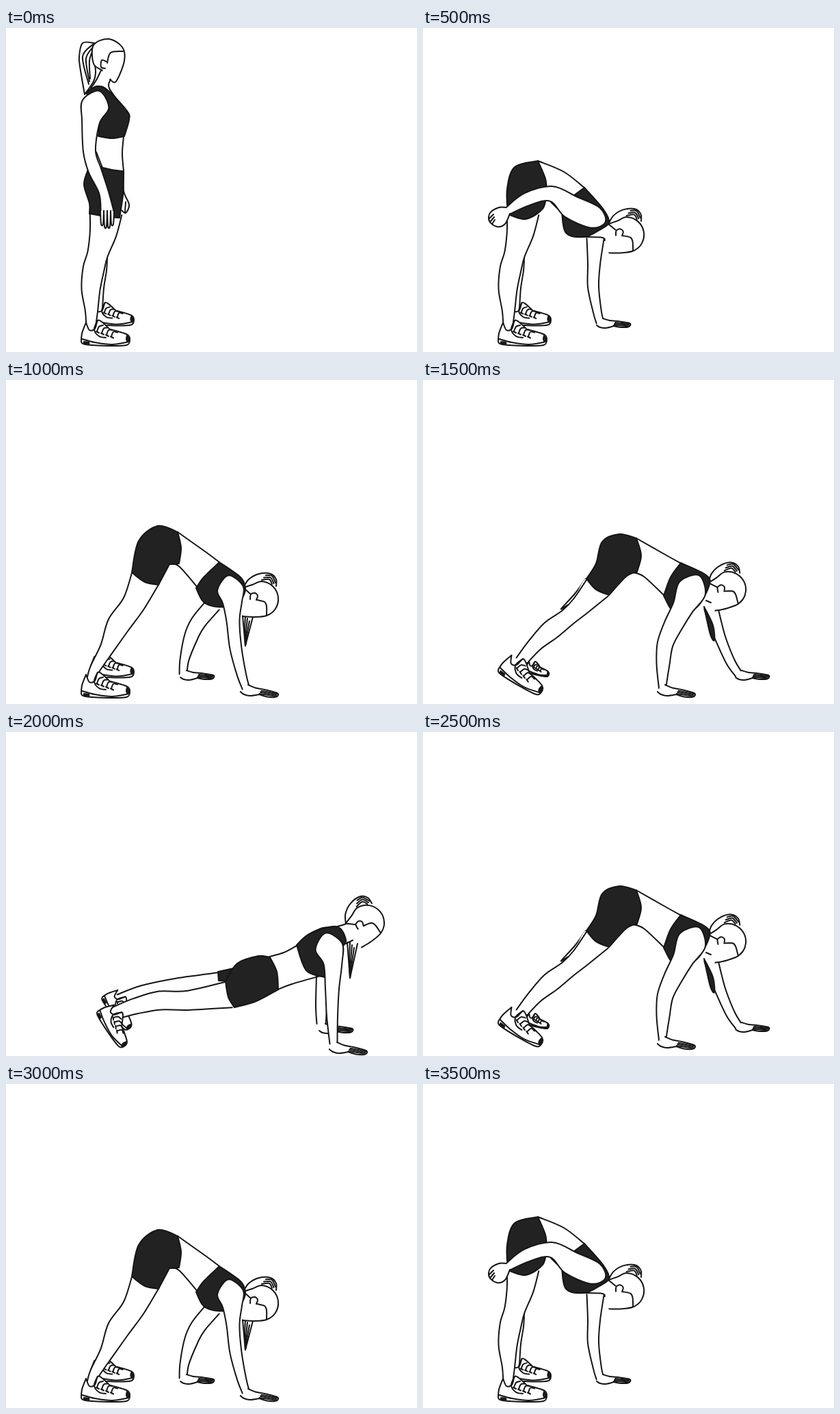
An HTML page with a canvas that plays this animation: 601 px wide and 473 px high, repeating every 4000 ms.

```html
<!DOCTYPE html>
<html lang="en">
<head>
<meta charset="utf-8">
<title>Walkout exercise</title>
<style>
html, body { margin: 0; width: 100%; height: 100%; overflow: hidden; background: #fff; }
canvas { display: block; }
</style>
</head>
<body>
<canvas id="stage" width="601" height="473"></canvas>
<script>
const ctx = document.getElementById('stage').getContext('2d');
const INK = '#151515', CLOTH = '#222222', SKIN = '#fff';
const STEP = 500;

const parse = text => text.trim().split(/\s+/).map(p => p.split(',').map(Number));

// Appends a smooth curve through the points to the path.
function spline(path, pts) {
  for (let i = 0; i < pts.length - 1; i++) {
    const b = pts[i], c = pts[i + 1];
    const a = pts[i - 1] || b, d = pts[i + 2] || c;
    path.bezierCurveTo(
      b[0] + (c[0] - a[0]) / 6, b[1] + (c[1] - a[1]) / 6,
      c[0] - (d[0] - b[0]) / 6, c[1] - (d[1] - b[1]) / 6, c[0], c[1]);
  }
}

// Reads "x,y" key points; a slash makes the point before it a corner.
function trace(text) {
  const path = new Path2D();
  let last = null;
  for (const part of text.split('/')) {
    const pts = parse(part);
    if (last) pts.unshift(last);
    else path.moveTo(...pts[0]);
    spline(path, pts);
    last = pts[pts.length - 1];
  }
  return path;
}

function line(...texts) {
  for (const text of texts) ctx.stroke(trace(text));
}

function paint(path, color) {
  ctx.fillStyle = color;
  ctx.fill(path);
  ctx.stroke(path);
}

const skin = text => paint(trace(text), SKIN);
const dark = text => paint(trace(text), CLOTH);

// Tapered limb along "x,y,width" joints, open at the far end; round closes the near end.
function limb(text, round = false) {
  const joints = parse(text);
  const left = [], right = [];
  let cap;
  joints.forEach(([x, y, width], i) => {
    const from = joints[i - 1] || joints[i], to = joints[i + 1] || joints[i];
    const angle = Math.atan2(to[1] - from[1], to[0] - from[0]);
    const dx = Math.cos(angle) * width / 2, dy = Math.sin(angle) * width / 2;
    left.unshift([x + dy, y - dx]);
    right.push([x - dy, y + dx]);
    if (i === 0) cap = [x - dx, y - dy];
  });
  const outline = [...left, ...(round ? [cap] : []), ...right];
  const body = new Path2D();
  body.moveTo(...outline[0]);
  spline(body, outline);
  ctx.fillStyle = SKIN;
  ctx.fill(body);
  for (const side of round ? [outline] : [left, right]) {
    const edge = new Path2D();
    edge.moveTo(...side[0]);
    spline(edge, side);
    ctx.stroke(edge);
  }
}

function placed(x, y, turn, size, draw) {
  ctx.save();
  ctx.translate(x, y);
  ctx.rotate(turn);
  ctx.scale(size, size);
  ctx.lineWidth /= size;
  draw();
  ctx.restore();
}

// x,y is the upper side of the wrist.
function hand(x, y, turn = 0, size = 1) {
  placed(x, y, turn, size, () => {
    skin('-9,10 -4,13 4,14 16,11 / 26,13 38,12 39,7 22,4 10,3 0,0');
    for (let i = 0; i < 3; i++) line(`${18 - i},${6 + i * 2} ${39 - i},${8 + i * 1.6}`);
  });
}

// x,y is the lower back corner of the heel.
function shoe(x, y, turn = 0, size = 1) {
  placed(x, y, turn, size, () => {
    skin('7,-28 1,-12 0,0 / 6,4 40,6 66,5 71,-2 68,-10 54,-15 42,-18 / 30,-29 24,-31 20,-19 12,-17 7,-28');
    line('1,-4 20,1 45,4 70,0', '24,-31 19,-18 26,-8 36,-6');
    for (let i = 0; i < 4; i++) {
      const px = 23 + i * 7, py = -15 + i * 2.5;
      line(`${px},${py} ${px + 3},${py - 7} ${px + 9},${py - 9 + i}`, `${px - 1},${py} ${px + 3},${py + 2}`);
    }
    dark('4,0 11,1 / 11,3 4,2 / 4,0');
    dark('67,-9 70,-4 68,0 66,-4 67,-9');
  });
}

// Lowered head with its bun; x,y is the middle of the skull.
function head(x, y, turn) {
  placed(x, y, turn, 1, () => {
    skin('-25,-17 -17,-29 -2,-37 15,-37 23,-29 23,-19');
    for (let i = 0; i < 3; i++) line(`${2 + i * 3},${-28 - i * 3.5} ${13 + i * 2},${-29 - i * 2.5} ${17 + i * 2.5},${-22 - i}`);
    skin('-25,-17 -12,-21 2,-26 18,-19 26,-3 22,14 9,24 -10,26 -26,25');
    line('-25,-17 -15,-8', '-15,0 -14,-7 -8,-9 -4,-5 -6,1', '-5,1 6,4 9,10 9,23');
  });
}

function hangingHair(x, y, length) {
  skin(`${x},${y} ${x + 4},${y + length} / ${x + 15},${y + 2}`);
  for (let i = 0; i < 3; i++) line(`${x + 4},${y + length} ${x + 3 + i * 2},${y + length * .55} ${x + 4 + i * 3},${y + i * 4}`);
}

function standingLegs() {
  line('148,335 147,354 143,380 141,410');
  shoe(123,429, 0, .9);
  limb('146,270,47 142,300,39 134,330,30 128,352,31 124,382,27 125,414,18 124,440,13');
  shoe(110,458);
}

function stand() {
  standingLegs();
  skin('172,210 172,238 180,258 175,270 169,266');
  line('174,269 175,254', '172,158 170,183 172,209', '132,181 141,204');
  dark('121,204 114,228 122,256 122,271 / 144,275 166,277 / 171,244 172,209 / 155,207 137,203 / 121,204');

  skin('129,22 112,22 107,42 109,62 115,97 / 128,78 131,62 126,36');
  for (let i = 0; i < 3; i++) line(`127,${24 + i * 4} ${112 + i * 5},${42 + i * 3} ${121 + i},${82 - i * 4}`);
  skin('141,62 128,52 128,25 150,16 170,28 173,48 161,78 152,75');
  line('139,62 132,76 124,88', '153,75 151,88 172,117', '171,34 153,36 148,51', '147,49 140,47 139,57 145,59');

  dark('117,94 133,85 149,91 177,121 180,134 173,158 / 155,161 135,158 / 137,135 / 117,94');
  limb('131,111,40 124,137,26 122,180,18 130,208,19 143,240,14 148,268,19', true);
  for (let i = 0; i < 4; i++) {
    const x = 138 + i * 5, tip = 286 + 4 * Math.sin(Math.PI * i / 3);
    skin(`${x},267 ${x + 1},${tip} ${x + 4},${tip} ${x + 5},267`);
  }
}

function bend() {
  standingLegs();
  limb('252,308,25 250,345,18 249,378,16 255,415,12 259,430,11');
  hand(263,424);
  line('168,194 206,210 237,234', '186,253 203,270');
  dark('124,272 123,235 134,203 168,194 / 179,220 181,240 / 175,264 150,279 124,272');
  head(297,302, -.05);
  line('236,305 262,306 266,310');
  dark('236,233 264,265 272,284 258,295 / 236,305 209,299 203,268 / 221,244 / 236,233');
  limb('252,277,32 216,261,34 188,242,22 152,250,19 124,267,11', true);
  skin('121,262 111,262 98,270 97,282 108,290 120,286 127,271');
  for (let i = 0; i < 3; i++) line(`${97 + i * 2},${278 + i * 4} ${103 + i},${272 + i * 4}`);
}

function pike() {
  line('159,390 148,407');
  shoe(123,429, 0, .9);
  limb('204,289,43 187,326,34 164,358,33 148,391,21 130,422,15 124,440,13');
  shoe(110,458);
  limb('303,328,23 281,354,22 271,374,20 261,408,13 259,430,11');
  hand(264,424);
  line('251,222 292,251 312,266', '239,269 253,272 281,304');
  dark('184,281 194,235 222,213 251,222 / 256,245 253,268 / 239,269 / 223,299 / 203,295 184,281');
  hangingHair(346,344, 44);
  head(372,320, 0);
  dark('312,266 343,288 350,304 347,316 / 321,331 291,326 278,304 / 289,288 312,266');
  limb('328,304,38 331,325,28 332,352,19 336,392,17 345,432,13 352,453,10', true);
  hand(354,445, .1, 1.12);
}

function stretch() {
  shoe(149,424, .2, .5);
  line('238,290 222,312 202,334 212,328');
  limb('256,302,40 231,329,29 212,346,25 187,365,28 164,386,21 143,411,17');
  shoe(110,423, .5);
  limb('421,332,20 428,357,18 436,380,15 450,412,13 462,430,11');
  hand(466,424);
  dark('411,331 420,371 426,380 424,358 411,331');
  line('312,231 356,256 378,268', '306,281 323,287 353,315');
  dark('239,290 253,268 262,236 287,225 312,231 / 319,256 313,280 / 297,287 272,314 / 253,306 239,290');
  head(446,306, -.26);
  line('414,322 421,325');
  dark('377,267 413,284 419,298 404,328 385,342 / 366,339 352,315 / 362,288 377,267');
  limb('394,304,42 380,332,31 365,360,27 354,386,23 351,415,19 350,450,10', true);
  hand(354,445, .1, 1.12);
}

function plank() {
  limb('165,391,16 200,380,20 250,371,23 313,362,22');
  shoe(141,387, .9, .85);
  dark('310,350 337,344 / 332,362 311,363 / 310,350');
  limb('157,411,18 190,400,23 225,392,27 265,392,28 328,383,39');
  shoe(134,408, .95, .9);
  limb('461,356,14 461,400,16 461,426,13');
  hand(467,426);
  line('385,328 406,322 425,312', '397,376 418,368 460,356', '447,293 463,286 480,285 498,280');
  dark('321,364 338,338 369,327 386,329 / 396,350 398,376 / 366,393 334,402 / 325,387 321,364');
  hangingHair(499,307, 52);
  head(527,279, -.61);
  line('497,309 507,304');
  dark('425,311 445,294 483,284 497,303 491,315 / 466,358 / 439,348 425,311');
  limb('472,313,40 478,338,27 477,375,20 477,415,16 479,455,11', true);
  hand(484,453, .1, 1.12);
}

const poses = [stand, bend, pike, stretch, plank, stretch, pike, bend];
let shown = -1;

function render(now) {
  const step = Math.floor(now / STEP) % poses.length;
  if (step === shown) return;
  shown = step;
  ctx.fillStyle = '#fff';
  ctx.fillRect(0, 0, 601, 473);
  ctx.strokeStyle = INK;
  ctx.lineWidth = 2;
  ctx.lineCap = ctx.lineJoin = 'round';
  poses[step]();
}

const start = performance.now();
function tick() {
  render(performance.now() - start);
  requestAnimationFrame(tick);
}
tick();
</script>
</body>
</html>
```
